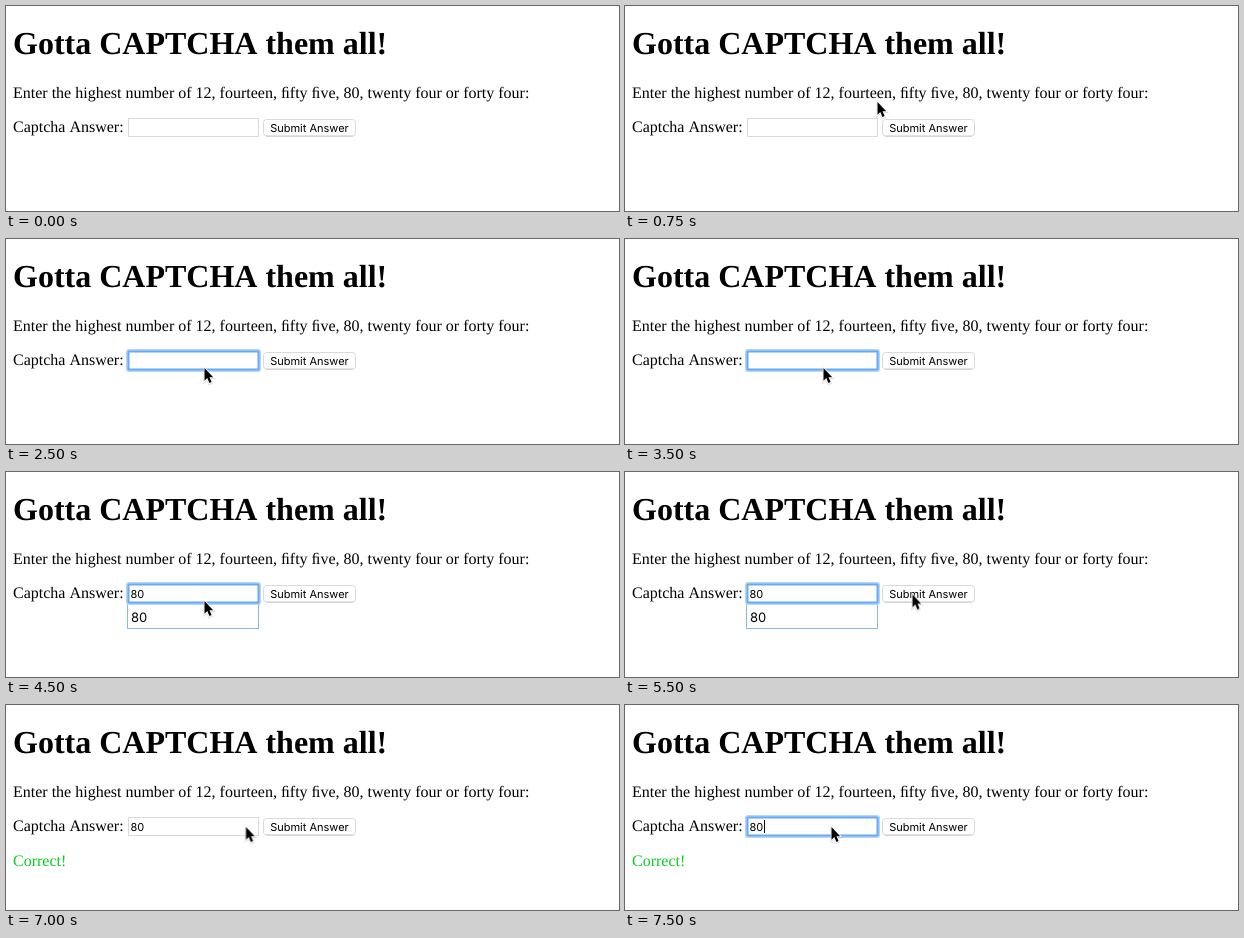
Write an HTML page that moves like this. It is 613 by 205 pixels and loops after 8000 ms.

```html
<!DOCTYPE html>
<html lang="en">
<head>
<meta charset="utf-8">
<title>Captcha form</title>
<style>
  html, body { margin: 0; width: 100%; height: 100%; overflow: hidden; background: #fff; }
  svg { display: block; width: 613px; height: 205px; }
  text {
    font: 16px "Liberation Serif", "Times New Roman", serif;
    font-kerning: none;
    text-rendering: geometricPrecision;
  }
  .title { font-size: 32px; font-weight: bold; }
  .ui { font: 11px Inter, "Open Sans", sans-serif; }
  .option { font-size: 13px; }

  .timed { visibility: hidden; animation: 8s step-end infinite; }
  .ring { animation-name: ring; }
  .menu { animation-name: menu; }
  .typed { animation-name: typed; }
  .caret-empty { animation-name: caret-empty; }
  .caret-typed { animation-name: caret-typed; }
  .pressed { animation-name: pressed; }
  .correct { animation-name: correct; }
  .pointer { animation: pointer 8s step-end infinite; }

  @keyframes ring {
    0%, 71.875% { visibility: hidden; }
    25%, 93.75%, 100% { visibility: visible; }
  }
  @keyframes menu {
    0%, 71.875%, 100% { visibility: hidden; }
    50% { visibility: visible; }
  }
  @keyframes typed {
    0% { visibility: hidden; }
    50%, 100% { visibility: visible; }
  }
  @keyframes caret-empty {
    0%, 31.25%, 43.75%, 100% { visibility: hidden; }
    25%, 37.5% { visibility: visible; }
  }
  @keyframes caret-typed {
    0%, 56.25%, 68.75% { visibility: hidden; }
    50%, 62.5%, 93.75%, 100% { visibility: visible; }
  }
  @keyframes pressed {
    0%, 75%, 100% { visibility: hidden; }
    71.875% { visibility: visible; }
  }
  @keyframes correct {
    0% { visibility: hidden; }
    75%, 100% { visibility: visible; }
  }
  @keyframes pointer {
    0% { transform: translate(-30px, -30px); }
    6.25% { transform: translate(445px, 3px); }
    9.375% { transform: translate(251px, 95px); }
    12.5% { transform: translate(215px, 118px); }
    15.625% { transform: translate(212px, 121px); }
    21.875% { transform: translate(209.5px, 122.5px); }
    25% { transform: translate(197px, 128px); }
    59.375% { transform: translate(263px, 126px); }
    62.5% { transform: translate(279px, 125px); }
    65.625% { transform: translate(287px, 124px); }
    68.75% { transform: translate(286px, 121.5px); }
    84.375% { transform: translate(285.5px, 121px); }
    87.5% { transform: translate(238.5px, 121px); }
    90.625%, 100% { transform: translate(205px, 121px); }
  }
</style>
</head>
<body>
<svg viewBox="0 0 613 205">
  <defs>
    <linearGradient id="blue" x2="0" y2="1">
      <stop stop-color="#6db3fa"/>
      <stop offset="1" stop-color="#0f6cf7"/>
    </linearGradient>
    <path id="arrow" d="M1.5 1V13.7L4.3 11.1L6.4 16L8.6 15L6.5 10.2H10.2Z"/>
  </defs>

  <text class="title" x="7" y="48">Gotta CAPTCHA them all!</text>
  <!-- &#xFB01; is the fi ligature -->
  <text x="7" y="92">Enter the highest number of 12, fourteen, &#xFB01;fty &#xFB01;ve, 80, twenty four or forty four:</text>
  <text x="7" y="126">Captcha Answer:</text>
  <text class="timed correct" x="7" y="161" fill="#0acc20">Correct!</text>

  <!-- answer field -->
  <rect x="122.5" y="112.5" width="130" height="18" fill="#fff" stroke="#dadada"/>
  <g class="timed menu">
    <rect x="121.5" y="131.5" width="131" height="25" fill="#fff" stroke="#8fb5e8"/>
    <text class="ui option" x="125" y="150">80</text>
  </g>
  <g class="timed ring" fill="none">
    <rect x="121" y="111" width="133" height="21" rx="2" stroke="#b5d5fa" stroke-width="2"/>
    <rect x="122.5" y="112.5" width="130" height="18" rx=".5" stroke="#68aaf3" stroke-width="2"/>
  </g>
  <text class="ui timed typed" x="124.5" y="126">80</text>
  <rect class="timed caret-empty" x="125" y="115" width="1" height="13"/>
  <rect class="timed caret-typed" x="139" y="115" width="1" height="13"/>

  <!-- submit button -->
  <rect x="257.5" y="113.5" width="92" height="16.5" rx="3" fill="#fff" stroke="#dadada"/>
  <path d="M260 130.2H347" stroke="#c4c4c4" stroke-width=".8"/>
  <text class="ui" x="264.2" y="126">Submit Answer</text>
  <g class="timed pressed">
    <rect x="257" y="113" width="93" height="17.5" rx="3.5" fill="url(#blue)"/>
    <text class="ui" x="264.2" y="126" fill="#fff">Submit Answer</text>
  </g>

  <g class="pointer">
    <use href="#arrow" y=".8" stroke="#000" stroke-width="2.4" opacity=".12"/>
    <use href="#arrow" stroke="#fff" stroke-width="1.6"/>
    <use href="#arrow"/>
  </g>
</svg>
</body>
</html>
```
